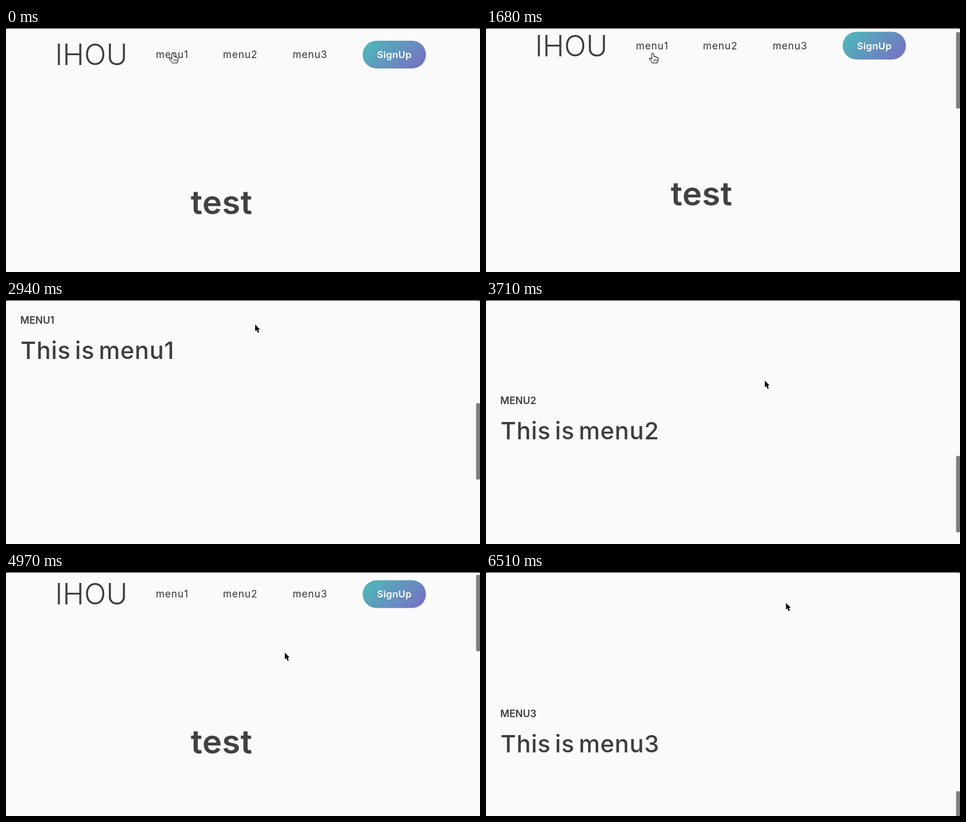
These frames come from a looping animation (816 px wide and 422 px high, 6.58 s). An HTML page with a canvas:

```html
<!DOCTYPE html>
<html lang="en">
<head>
<meta charset="utf-8">
<title>Menu scrolling</title>
<style>
  html, body { margin: 0; width: 100%; height: 100%; overflow: hidden; background: #222; }
  canvas { display: block; }
</style>
</head>
<body>
<canvas id="stage" width="816" height="422"></canvas>
<script>
const ctx = document.getElementById('stage').getContext('2d');
const W = 816, H = 422, LOOP = 6580, STEP = 70;
const FONT = 'Inter, "Open Sans", sans-serif';
const INK = '#3e3e40';

const LINKS = [
  { label: 'menu1', x: 258, w: 57 },
  { label: 'menu2', x: 373.5, w: 62 },
  { label: 'menu3', x: 493.5, w: 61 }
];
const SECTION = 475, FIRST_TITLE = 749;
const STOPS = [513, 988, 1387];

const HAND = new Path2D('M-1.5 9V1.5Q-1.5-.5 .4-.5Q2-.5 2 1.5L2.3 5.5Q4.5 4.6 5 6.4Q7 5.6 7.5 7.3' +
  'Q9.5 6.9 9.5 9L9 12.5L7.5 16.5H-.5Q-2 14-5 10.5Q-6.3 8.4-4.5 7.8Q-3 7.8-1.5 10Z');
const CREASES = new Path2D('M2 10V13.5M4.3 10V13.5M6.6 10V13.5');
const ARROW = new Path2D('M0 0V11.5L2.6 9.2L4.6 14L6.8 13L4.8 8.4H8.2Z');

const clamp = v => Math.min(1, Math.max(0, v));
const ease = p => (1 - Math.cos(Math.PI * clamp(p))) / 2;
const mix = (a, b, p) => a + (b - a) * p;
const within = (t, a, b) => t >= a && t < b;

function hermite(p, y0, y1, m0, m1) {
  const q = p * p, c = q * p;
  return (2 * c - 3 * q + 1) * y0 + (c - 2 * q + p) * m0 + (3 * q - 2 * c) * y1 + (c - q) * m1;
}

// Smooth scrolls down to a section, flicked scrolls back to the top.
function scrollAt(t) {
  const glide = (start, to) => to * ease((t - start) / 700);
  if (t < 1260) return glide(70, STOPS[0]);
  if (t < 2520) return t < 2240 ? 446 * Math.exp((1260 - t) / 125) : 0;
  if (t < 3710) return glide(2520, STOPS[1]);
  if (t < 4410) return hermite((t - 3710) / 700, 983, 188, -50, -750);
  if (t < 5740) return t < 5460 ? 188 * Math.exp((4410 - t) / 175) : 0;
  return glide(5740, STOPS[2]);
}

const MOVES = [
  { from: 1680, to: 2240, x: 429, y: 42 },
  { from: 3220, to: 3500, x: 480, y: 139 },
  { from: 5040, to: 5460, x: 516.5, y: 53 }
];

function pointerAt(t) {
  let x = 287, y = 44;
  for (const m of MOVES) {
    const p = ease((t - m.from) / (m.to - m.from));
    x = mix(x, m.x, p);
    y = mix(y, m.y, p);
  }
  return { x, y };
}

function barAlpha(t) {
  if (t < 140) return 0;
  if (t < 2590) return 1 - clamp((t - 2090) / 210);
  if (t < 5810) return 1 - clamp((t - 5550) / 225);
  return 1;
}

function text(str, x, y, size, weight, color = INK, spacing = 0, wordGap = 0) {
  ctx.font = `${weight} ${size}px ${FONT}`;
  ctx.letterSpacing = spacing + 'px';
  ctx.wordSpacing = wordGap + 'px';
  ctx.fillStyle = color;
  ctx.fillText(str, x, y);
}

function box(x, y, w, h, r, fill) {
  ctx.beginPath();
  ctx.roundRect(x, y, w, h, r);
  ctx.fillStyle = fill;
  ctx.fill();
}

function drawButton() {
  const g = ctx.createLinearGradient(629.25, 6.75, 707.75, 85.25);
  g.addColorStop(0, '#4bbdb8');
  g.addColorStop(1, '#7a6cc4');
  box(614, 22, 109, 48, 24, g);
  ctx.textAlign = 'center';
  text('SignUp', 668.5, 52, 16.5, 600, '#fff', 0.3);
  ctx.textAlign = 'left';
}

function drawPage(scroll) {
  ctx.save();
  ctx.translate(0, -scroll);
  text('IHOU', 84.5, 64, 50, 300);
  for (const l of LINKS) text(l.label, l.x, 52, 17, 400, '#333', 0.9);
  drawButton();
  text('test', 318, 322, 57, 600, '#414143', 0.4);
  for (let i = 0; i < 3; i++) {
    const y = FIRST_TITLE + i * SECTION, name = LINKS[i].label;
    text(name.toUpperCase(), 24.5, y - 61, 17, 600);
    text('This is ' + name, 25, y, 41, 500, INK, 0.7, -4.5);
  }
  ctx.restore();
}

function drawPointer({ x, y }, scroll) {
  const py = y + scroll;
  const over = py > 30 && py < 62 && LINKS.some(l => x >= l.x && x <= l.x + l.w);
  ctx.save();
  ctx.translate(x, y);
  ctx.lineJoin = 'round';
  if (over) {
    ctx.fillStyle = '#fff';
    ctx.fill(HAND);
    ctx.strokeStyle = '#111';
    ctx.lineWidth = 1.1;
    ctx.stroke(HAND);
    ctx.lineWidth = 0.9;
    ctx.stroke(CREASES);
  } else {
    ctx.translate(0, 0.5);
    ctx.strokeStyle = '#fff';
    ctx.lineWidth = 1;
    ctx.stroke(ARROW);
    ctx.fillStyle = '#000';
    ctx.fill(ARROW);
  }
  ctx.restore();
}

function drawRing({ x, y }) {
  ctx.beginPath();
  ctx.arc(x, y, 30.3, 0, Math.PI * 2);
  ctx.strokeStyle = '#111';
  ctx.lineWidth = 1.7;
  ctx.stroke();
}

function draw(t) {
  const scroll = scrollAt(t), pointer = pointerAt(t);
  ctx.fillStyle = '#222';
  ctx.fillRect(0, 0, W, H);
  ctx.save();
  box(0, 1, W, H - 1, [2, 2, 1, 1], '#fafafa');
  ctx.clip();
  drawPage(scroll);
  box(809.3, 2.7 + scroll * 0.2713, 7, 132.5, 3, `rgba(0,0,0,${0.5 * barAlpha(t)})`);
  ctx.restore();
  if (within(t, 2310, 2590) || within(t, 5530, 5810)) drawRing(pointer);
  drawPointer(pointer, scroll);
}

const begin = performance.now();
function tick() {
  const t = (performance.now() - begin) % LOOP;
  draw(Math.floor(t / STEP) * STEP);
  requestAnimationFrame(tick);
}
tick();
</script>
</body>
</html>
```
